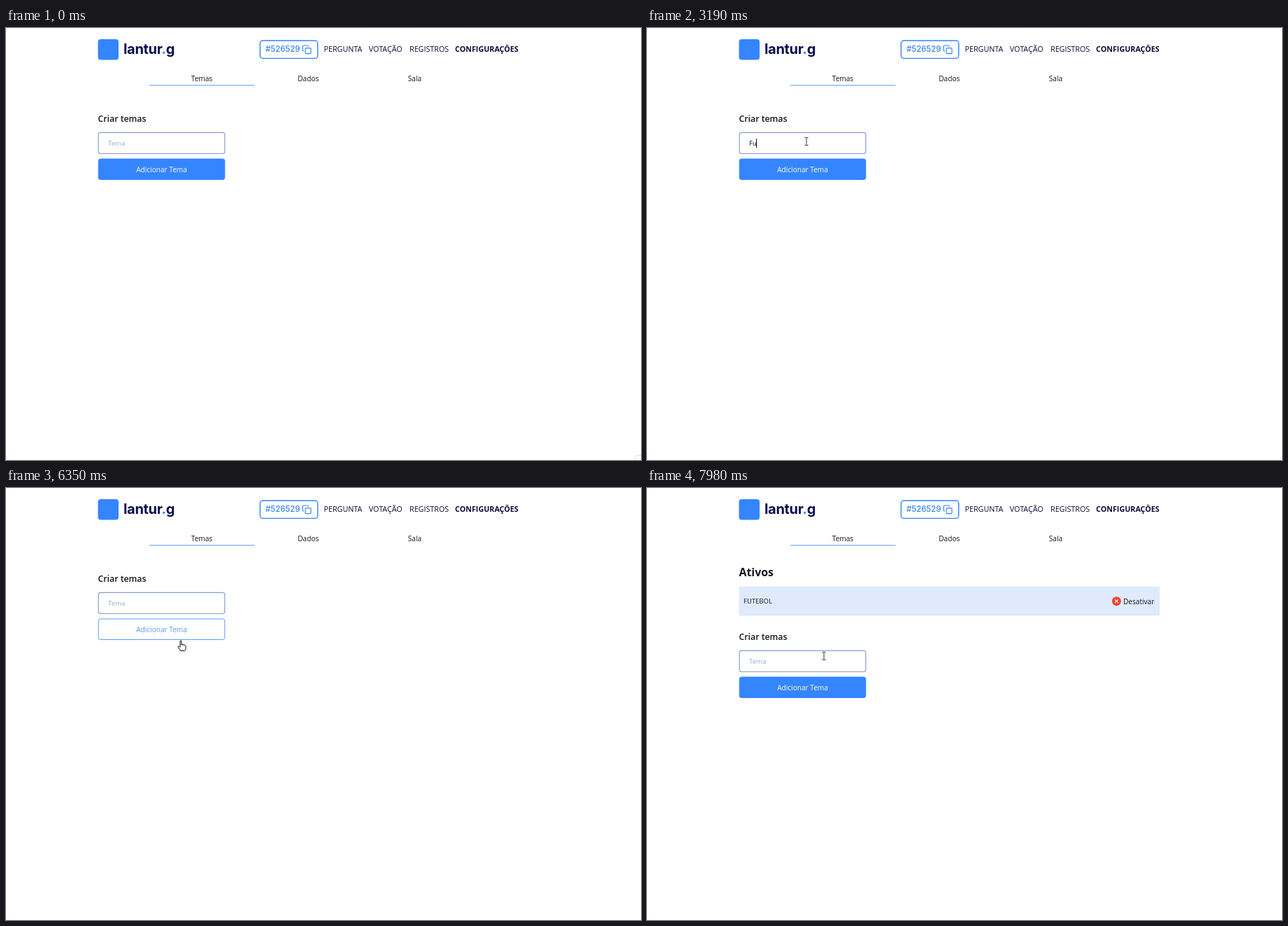
Write an HTML page that moves like this. It is 908 by 617 pixels and loops after 8000 ms.

```html
<!DOCTYPE html>
<html lang="pt">
<head>
<meta charset="utf-8">
<title>Temas</title>
<style>
  html, body { margin: 0; width: 100%; height: 100%; overflow: hidden; background: #fff; }
  svg { display: block; width: 908px; height: 617px; font: 10.1px "Open Sans", sans-serif; fill: #15151f; }
  .nav { font-size: 10.75px; fill: #0c0c38; }
  .brand { font: 700 20px Inter, sans-serif; letter-spacing: -.3px; fill: #0c0c4f; }
  .code { font: 500 11.4px Inter, sans-serif; fill: #3585f5; }
  .mid { text-anchor: middle; }
  .line { fill: none; stroke: #3585f5; stroke-width: 1.4; }
  .thin { stroke-width: 1.2; }
  .field { font-size: 9.6px; }
  .bold { font-weight: 700; }
</style>
</head>
<body>
<svg viewBox="0 0 908 617">
  <rect x="131.5" y="16" width="29.5" height="29.5" rx="4" fill="#3485ff"/>
  <text class="brand" x="168" y="37">lantur<tspan fill="#3485ff">.</tspan>g</text>

  <rect class="line" x="363.3" y="18" width="82.4" height="25.4" rx="4"/>
  <text class="code" x="371" y="34.3">#526529</text>
  <g class="line thin">
    <rect x="428" y="28.7" width="8" height="8" rx="1.2"/>
    <path d="M426 33H425.2Q424.2 33 424.2 32V26Q424.2 25 425.2 25H431.2Q432.2 25 432.2 26V26.8"/>
  </g>
  <g class="nav">
    <text x="454.5" y="34">PERGUNTA</text>
    <text x="518.8" y="34">VOTAÇÃO</text>
    <text x="577" y="34">REGISTROS</text>
    <text class="bold" x="642" y="34">CONFIGURAÇÕES</text>
  </g>

  <g class="mid">
    <text x="280" y="76">Temas</text>
    <text x="432.3" y="76">Dados</text>
    <text x="584.5" y="76">Sala</text>
  </g>
  <path d="M205 81.8H355.5" stroke="#78acf8" stroke-width="1.3"/>

  <g id="list">
    <text class="bold" x="131.5" y="126" font-size="15.9">Ativos</text>
    <rect x="131.5" y="140.5" width="601.5" height="42" fill="#dfeafd"/>
    <text x="138" y="165" font-size="9.5">FUTEBOL</text>
    <g id="icon">
      <circle cx="671.4" cy="161.7" r="6.5" fill="#f44336"/>
      <path d="M669.2 159.5l4.4 4.4m0-4.4l-4.4 4.4" stroke="#fff" stroke-width="1.2"/>
    </g>
    <text x="681" y="165.5">Desativar</text>
  </g>

  <g id="form">
    <text x="131.5" y="134" font-size="12.3" font-weight="600">Criar temas</text>
    <rect x="132.2" y="149.3" width="180.6" height="30.2" rx="3" fill="#fff" stroke="#8b9dca" stroke-width="1.2"/>
    <text id="hint" class="field" x="146" y="168.3" fill="#98abc9">Tema</text>
    <text id="typed" class="field" x="146" y="168.3"></text>
    <rect id="caret" y="158" width="1" height="13" fill="#111"/>
    <rect id="button" x="132.2" y="187" width="180.6" height="29.5" rx="3"/>
    <text id="label" class="mid" x="222.5" y="205.7">Adicionar Tema</text>
  </g>

  <path id="corner" d="M908 610.5H900.5V617" fill="none" stroke="#dfe1ee"/>

  <g id="pointer" stroke="#111" stroke-linejoin="round" fill="#fff">
    <path id="arrow" stroke-width=".9" d="M.5 .5V11.2L2.9 8.9 4.5 12.5 6.2 11.8 4.6 8.2H7.8Z"/>
    <path id="beam" stroke="#333" fill="none" d="M-2.5-5.5H-.7L0-5 .7-5.5H2.5M0-5V5M-2.5 5.5H-.7L0 5 .7 5.5H2.5"/>
    <path id="hand" d="M-1 8V1a1 1 0 0 1 2 0V6Q1 4.8 2 5T3 6.4Q3.2 5.3 4 5.6T5 7Q5.4 6 6.2 6.5T7 8V11Q7 13 5.5 14.5H-.5Q-2 12-4 9.5Q-4.2 7.8-2.7 8L-1 9.5Z"/>
  </g>
</svg>
<script>
const $ = id => document.getElementById(id);
const show = (id, on) => $(id).style.display = on ? '' : 'none';
const within = (t, from, to) => t >= from && t < to;

const word = 'Futebol';
const focusTime = 1600, typeStart = 2910, typeEnd = 4240, keyGap = 221, blink = 550;
const clickTime = 5780, clearTime = 5920, listTime = 7150;

// Each pointer move: start, end, destination
const moves = [
  [70, 830, 280, 249],
  [900, 1040, 205, 142],
  [1170, 1790, 228, 162],
  [4770, 5030, 222, 178],
  [5100, 5320, 233, 202],
  [5790, 6550, 253, 221],
  [7840, 7980, 253, 240]
];

function pointerAt(t) {
  let x = 900, y = 604;
  for (const [start, end, toX, toY] of moves) {
    const u = Math.min(1, Math.max(0, (t - start) / (end - start)));
    const ease = u * u * (3 - 2 * u);
    x += (toX - x) * ease;
    y += (toY - y) * ease;
  }
  return [Math.round(x), Math.round(y)];
}

// The caret blinks from focus, stays lit while typing, then blinks again
function caretOn(t) {
  const since = t < typeStart ? t - focusTime : Math.max(0, t - typeEnd);
  return within(t, focusTime, clickTime) && Math.floor(since / blink) % 2 === 0;
}

function draw(t) {
  const listed = t >= listTime;
  show('list', listed);
  show('icon', t >= 7350);
  $('form').setAttribute('transform', `translate(0 ${listed ? 83 : 0})`);

  const count = Math.max(0, 1 + Math.floor((t - typeStart) / keyGap));
  const text = t < clearTime ? word.slice(0, count) : '';
  $('typed').textContent = text;
  show('hint', !text);
  show('caret', caretOn(t));
  $('caret').setAttribute('x', 146 + Math.round(text ? $('typed').getComputedTextLength() - .5 : 0));

  const hover = within(t, 5130, 6480);
  $('button').setAttribute('fill', hover ? '#fff' : '#3485ff');
  $('button').setAttribute('stroke', hover ? '#5b9bfc' : '#3485ff');
  $('label').setAttribute('fill', hover ? '#5b9af8' : '#fff');

  const beam = within(t, 1300, 5130) || t >= 7900;
  show('corner', t < 70);
  show('pointer', t >= 70);
  show('beam', beam);
  show('hand', hover);
  show('arrow', !beam && !hover);
  $('pointer').setAttribute('transform', `translate(${pointerAt(t)})`);
}

function tick() {
  draw(performance.now() % 8000);
  requestAnimationFrame(tick);
}
tick();
</script>
</body>
</html>
```
